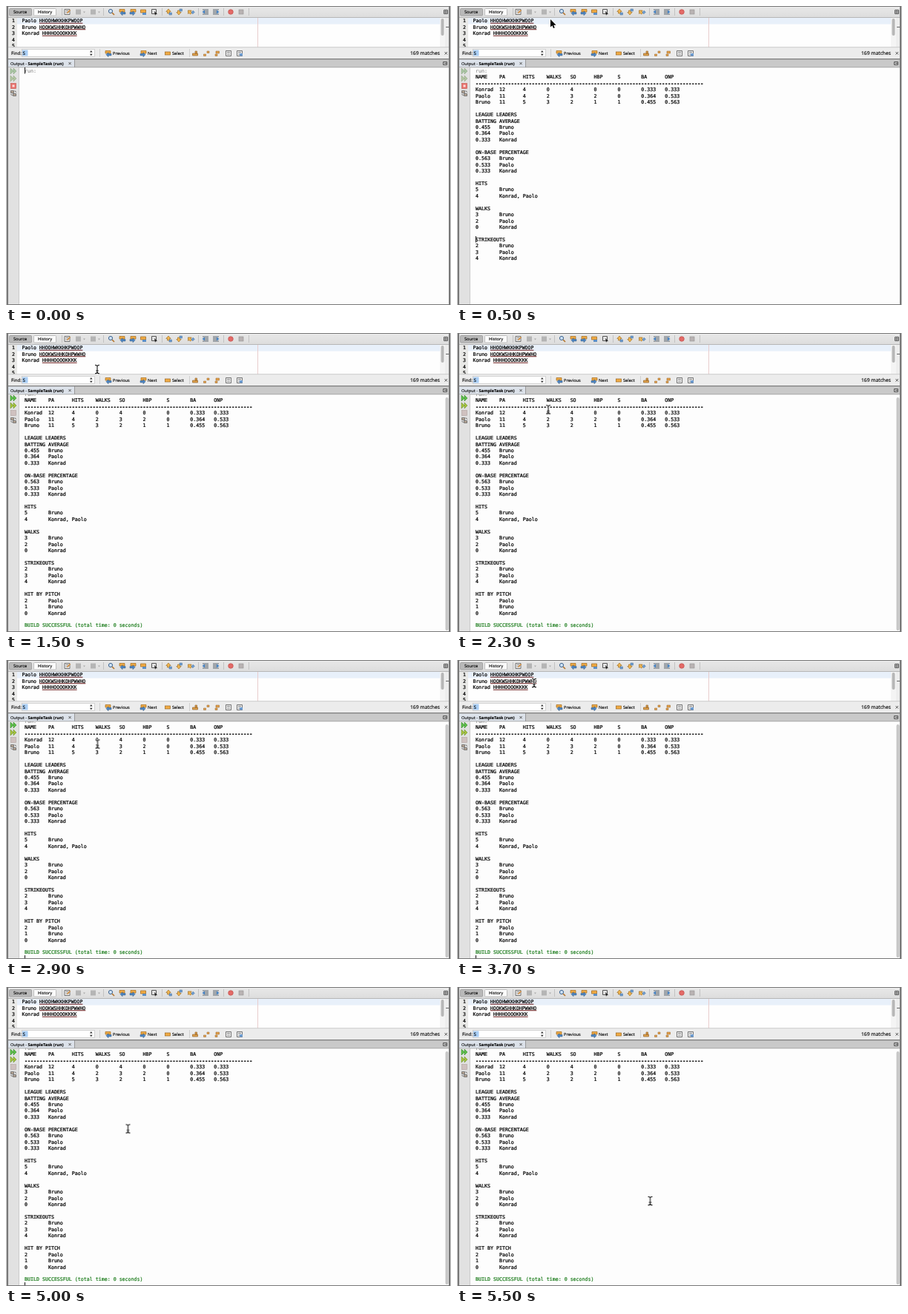
An HTML page that plays this animation: 600x404 px, repeating every 5600 ms.

```html
<!DOCTYPE html>
<html lang="en">
<head>
<meta charset="utf-8">
<title>Program output</title>
<style>
html, body { margin: 0; width: 100%; height: 100%; overflow: hidden; background: #fdfdfd; }
svg { display: block; width: 600px; height: 404px; }
text {
  font: 5.7px "Noto Sans", sans-serif; fill: #000; stroke: #000; stroke-width: .1;
  white-space: pre; text-rendering: geometricPrecision;
}
.mono text { font: 6.644px "DejaVu Sans Mono", monospace; stroke-width: .22; }
.code text { font-size: 6.48px; }
.mono .run { fill: #777; stroke: none; }
.mono .rule { stroke-width: .7; }
.mono .done { fill: #1d7d1d; stroke: #1d7d1d; }
.bold { font-weight: bold; }
.line { fill: none; stroke: #555; stroke-width: 1; }

#output, .running, .first, .second, #caret, #blink, #arrow, #beam {
  animation: 5.6s step-end infinite;
}
#output { animation-name: scroll; }
.running { animation-name: hide-later; }
.second { animation-name: show-second; }
.first { animation-name: show-first; }
#caret { animation-name: caret; }
#blink { animation-name: blink; }
#arrow { animation-name: arrow; }
#beam { animation-name: beam; }

@keyframes scroll { 0% { transform: none; } 10.714%, 100% { transform: translateY(-5px); } }
@keyframes hide-later { 0% { opacity: 1; } 10.714%, 100% { opacity: 0; } }
@keyframes show-second { 0% { opacity: 0; } 10.714%, 100% { opacity: 1; } }
@keyframes show-first { 0% { opacity: 0; } 8.928%, 100% { opacity: 1; } }
@keyframes caret {
  0% { transform: none; }
  8.928% { transform: translateY(228px); }
  10.714%, 100% { transform: translateY(321px); }
}
@keyframes blink {
  0%, 28.571%, 46.428%, 64.285%, 82.142% { opacity: 1; }
  19.642%, 37.5%, 55.357%, 73.214%, 91.071%, 100% { opacity: 0; }
}
@keyframes arrow {
  0% { opacity: 1; transform: translate(148px, -15px); animation-timing-function: steps(5); }
  8.928% { opacity: 1; transform: translate(126px, 18px); }
  10.714%, 100% { opacity: 0; transform: translate(126px, 18px); }
}
@keyframes beam {
  0% { opacity: 0; transform: translate(126px, 24px); }
  10.714% { opacity: 1; transform: translate(126px, 24px); animation-timing-function: steps(9); }
  26.785% { opacity: 1; transform: translate(123px, 49px); animation-timing-function: steps(4); }
  33.928% { opacity: 1; transform: translate(123px, 100px); }
  37.5% { opacity: 1; transform: translate(123px, 100px); animation-timing-function: steps(8); }
  51.785% { opacity: 1; transform: translate(123.5px, 113.5px); animation-timing-function: steps(8); }
  66.071% { opacity: 1; transform: translate(104px, 31px); animation-timing-function: steps(6); }
  76.785% { opacity: 1; transform: translate(30px, 55px); animation-timing-function: steps(12); }
  98.214%, 100% { opacity: 1; transform: translate(260.5px, 289px); }
}
</style>
</head>
<body>
<svg viewBox="0 0 600 404">
  <defs>
    <linearGradient id="bar" x2="0" y2="1">
      <stop stop-color="#e9e9e9"/><stop offset="1" stop-color="#dcdcdc"/>
    </linearGradient>
    <clipPath id="pane"><rect x="18" y="83" width="574" height="321"/></clipPath>
    <clipPath id="editor"><rect x="3" y="16" width="594" height="39.5"/></clipPath>
    <g id="sheet"><path d="M-3.5-3.5h7v7h-7z" fill="#f0f0f0" stroke="#666" stroke-width=".9"/><path d="M-2-1.5h4M-2 1h4" stroke="#777" stroke-width=".9"/></g>
    <g id="find-step"><path d="M-4-3.5h7v3.5h-7z" fill="#efaa45" stroke="#a36a1c" stroke-width=".7"/><path d="M4 .5h-4v-1.8l-3 3 3 3v-1.8h4z" fill="#4d86c4" stroke="#31577f" stroke-width=".5"/></g>
    <g id="mark-step"><path d="M-1-4l3.2 3.5h-1.7v2.500h-3v-2.500h-1.700z" fill="#f0b550" stroke="#96651b" stroke-width=".6"/><path d="M0 1h3.500v3h-3.500z" fill="#6c9bd0" stroke="#48709b" stroke-width=".5"/></g>
    <g id="indent"><path d="M-4-3h8M-1-1h5M-1 1h5M-4 3h8" stroke="#505a66" stroke-width=".9"/><path d="M-4.500 0l3.500-2.500v5z" fill="#427fc0"/></g>
    <g id="dots"><path d="M-3.500 1h3v2.500h-3zM1-3h3v2.500h-3z" fill="#e2a04b" stroke="#956124" stroke-width=".5"/></g>
    <path id="forward" d="M-4-4L0 0l-4 4zM0-4L4 0l-4 4z" stroke-width=".6"/>
    <path id="stem" d="M-3-5.7q3 0 3 2v7.400q0 2-3 2M3-5.700q-3 0-3 2M0 3.700q0 2 3 2M-1.700 2h3.400"/>
  </defs>

  <rect width="600" height="404" fill="#fdfdfd"/>

  <!-- toolbar -->
  <rect width="600" height="16" fill="url(#bar)"/>
  <rect x="4.5" y="3.5" width="30" height="9.5" rx="1" fill="#b9b9b9" stroke="#999" stroke-width=".8"/>
  <rect x="37.5" y="3.5" width="30" height="9.5" rx="1" fill="#fafafa" stroke="#b3b3b3" stroke-width=".8"/>
  <text x="10" y="10.4">Source</text>
  <text x="43" y="10.4">History</text>
  <path d="M75.5 3v10M131.5 3v10M210.5 3v10M259.5 3v10M293.5 3v10M327.5 3v10" stroke="#c2c2c2"/>
  <use href="#sheet" x="82.5" y="8"/>
  <path d="M82 9l4-4 1 1-4 4z" fill="#d98c34"/>
  <path d="M94 4.5h7v7h-7zM114 4.5h7v7h-7z" fill="#888" opacity=".5"/>
  <path d="M104 7.5h3l-1.5 2zM124 7.5h3l-1.5 2z" fill="#aaa"/>
  <circle cx="141" cy="7" r="2.6" fill="#cde0f3" stroke="#3e6590"/>
  <path d="M143 9l3 3" stroke="#b4742c" stroke-width="1.6"/>
  <use href="#find-step" x="157" y="8"/>
  <use href="#find-step" transform="translate(171 8) scale(-1 1)"/>
  <path d="M181.5 5h7v4h-7z" fill="#f0ab45" stroke="#99651f" stroke-width=".7"/>
  <path d="M184 9h5v3h-5z" fill="#5d8fc6"/>
  <path d="M196.5 4.5h6v6h-6z" fill="none" stroke="#555"/>
  <path d="M200 7l4 4-2 .2-1 1.5z" fill="#222"/>
  <use href="#mark-step" x="220" y="8"/>
  <use href="#mark-step" transform="translate(234 8) scale(1 -1)"/>
  <use href="#mark-step" transform="translate(249 8) rotate(-45)"/>
  <use href="#indent" x="269" y="8"/>
  <use href="#indent" transform="translate(283 8) scale(-1 1)"/>
  <circle cx="303" cy="8" r="3.3" fill="#e36a67" stroke="#ba4744" stroke-width=".6"/>
  <rect x="314" y="5" width="6" height="6" fill="#b9b3b3" stroke="#929292" stroke-width=".6"/>
  <path d="M590.5 5.5h5v5h-5zM593 5.5v5M590.5 8h5" class="line"/>

  <!-- editor -->
  <rect x="3" y="15.5" width="594" height="40.5" fill="#fefefe"/>
  <rect x="3" y="16" width="12" height="40" fill="#e9e9e7"/>
  <rect x="15" y="16" width="570" height="8.5" fill="#e8f0fa"/>
  <rect x="585" y="16" width="7" height="40" fill="#f4f4f4"/>
  <rect x="586.5" y="17" width="4" height="23" rx="2" fill="#b7b7b7"/>
  <rect x="592" y="16" width="5" height="40" fill="#ededed"/>
  <path d="M593 28.5h4" stroke="#666"/>
  <path d="M0 15.5H600" stroke="#a9a9a9" stroke-width=".8"/>
  <path d="M339.5 16v40" stroke="#e8cdcd"/>
  <g id="code" class="mono code" clip-path="url(#editor)"></g>

  <!-- find bar -->
  <rect y="55.5" width="600" height="16" fill="#ececec"/>
  <path d="M0 55.7H600" stroke="#bcbcbc" stroke-width=".7"/>
  <text x="7" y="66.2" style="font-size:6.1px">Find:</text>
  <rect x="21.5" y="58.5" width="98" height="10" fill="#fff" stroke="#c4c4c4" stroke-width=".7"/>
  <rect x="22" y="59.5" width="7.5" height="8" fill="#a9cef5"/>
  <text x="22.5" y="66.2" style="font-size:6.1px">S</text>
  <path d="M113 62.5l1.8-2.5 1.8 2.5zM113 64.8l1.8 2.5 1.8-2.5z" fill="#333"/>
  <path d="M126.5 58v11M247.5 58v11" stroke="#d0d0d0"/>
  <use href="#find-step" x="138" y="64"/>
  <text x="144" y="66.2">Previous</text>
  <use href="#find-step" transform="translate(185 64) scale(-1 1)"/>
  <text x="191" y="66.2">Next</text>
  <rect x="214.5" y="62" width="7" height="4" fill="#f0ab45" stroke="#99651f" stroke-width=".7"/>
  <text x="224" y="66.2">Select</text>
  <path d="M251.5 64h7v3h-7zM255 61h2.5v3h-2.5z" fill="#dda04c" stroke="#8c5a20" stroke-width=".6"/>
  <use href="#dots" x="270" y="64"/>
  <path d="M283 61h4.5v3h-4.5zM282 65h3v2.5h-3z" fill="#e2a04b" stroke="#956124" stroke-width=".5"/>
  <use href="#sheet" x="300" y="64"/>
  <use href="#sheet" x="315" y="64"/>
  <path d="M315 64h4v3.5h-4z" fill="#6c9bd0"/>
  <text x="545" y="66.3" style="font-size:6.7px">169 matches</text>
  <path d="M591.5 62l3.5 3.5m0-3.5l-3.5 3.5" class="line"/>

  <!-- output tab -->
  <rect y="71.5" width="600" height="11.5" fill="#c9c9c9"/>
  <path d="M0 71.7H600" stroke="#666"/>
  <rect x="3" y="72.5" width="89" height="10.5" fill="#dce2ea"/>
  <path d="M92.5 72v11" stroke="#999"/>
  <path d="M0 82.8H600" stroke="#9d9d9d" stroke-width=".8"/>
  <text x="6" y="80" style="font-size:5.6px">Output - <tspan class="bold">SampleTask (run)</tspan></text>
  <path d="M84.5 76l3.2 3.2m0-3.2l-3.2 3.2" class="line"/>
  <path d="M589.5 75.5h5v4h-5zM591 77.5h3.5" class="line"/>

  <!-- output side strip -->
  <rect x="3" y="83" width="14.5" height="321" fill="#e1e1e1"/>
  <path d="M17.5 83v321" stroke="#c2c2c2" stroke-width=".8"/>
  <g class="running">
    <use href="#forward" x="10" y="88" fill="#a9c6a2" stroke="#8da889"/>
    <use href="#forward" x="10" y="98" fill="#b2c6a2" stroke="#94a889"/>
    <rect x="6.5" y="104.5" width="7" height="7" fill="#e8716c" stroke="#c9605b" stroke-width=".7"/>
    <rect x="8.5" y="106.5" width="3" height="3" fill="#fbdcda"/>
  </g>
  <g class="second">
    <use href="#forward" x="10" y="88" fill="#5dc04a" stroke="#358c28"/>
    <use href="#forward" x="10" y="98" fill="#a8c43c" stroke="#66902c"/>
    <rect x="6.5" y="104.5" width="7" height="7" fill="#cfc1bf" stroke="#b7a9a7" stroke-width=".7"/>
  </g>
  <path d="M6.5 114.5h4v3h-4zM9.5 118.5h4v3h-4z" fill="#b5a493" stroke="#666" stroke-width=".8"/>
  <path d="M12 114.5l1.5 2M6.5 119l2 2" class="line"/>

  <g clip-path="url(#pane)">
    <g id="output" class="mono">
      <g id="caret"><rect id="blink" x="25" y="83" width="1" height="8.5" fill="#111"/></g>
    </g>
  </g>
  <rect class="second" x="592.5" y="87" width="4" height="315" rx="2" fill="#c6c6c6"/>

  <!-- window frame -->
  <path d="M0 .5H600M0 403.5H600" stroke="#777"/>
  <path d="M.5 0v404M599.5 0v404" stroke="#c8c8c8"/>
  <path d="M2 0v404M598 0v404" stroke="#777" stroke-width="2"/>

  <path id="arrow" d="M0 0v10.5l2.4-2.2L4 12l1.8-.8-1.6-3.5h3.4z" stroke="#fff" stroke-width="1.2" paint-order="stroke"/>
  <g id="beam" fill="none">
    <use href="#stem" stroke="#fff" stroke-width="2.6"/>
    <use href="#stem" stroke="#111" stroke-width="1.1"/>
  </g>
</svg>
<script>
const LINE = 8.445;
const CODE_CHAR = 3.9;
const svgNS = 'http://www.w3.org/2000/svg';

function add(parent, tag, attrs, content = '') {
  const node = document.createElementNS(svgNS, tag);
  for (const key in attrs) node.setAttribute(key, attrs[key]);
  node.textContent = content;
  return parent.appendChild(node);
}

const code = document.getElementById('code');
const players = [['Paolo', 'HHOOHWKKHKPWOOP'], ['Bruno', 'HOOKWSHHKOHPWWHO'], ['Konrad', 'HHHHOOOOKKKK']];
for (let i = 0; i < 5; i++) {
  const y = 22.4 + i * LINE;
  add(code, 'text', { x: 8, y }, i + 1);
  if (!players[i]) continue;
  const [name, plays] = players[i];
  const start = 21.5 + (name.length + 1) * CODE_CHAR;
  add(code, 'text', { x: 21.5, y }, `${name} ${plays}`);
  add(code, 'path', {
    d: `M${start} ${y + 0.9}h${plays.length * CODE_CHAR}`,
    stroke: '#6e1c1c', 'stroke-width': 1.1
  });
}

const listing = `run:
NAME|PA|HITS|WALKS|SO|HBP|S|BA|ONP
${'-'.repeat(77)}
Konrad|12|4|0|4|0|0|0.333|0.333
Paolo|11|4|2|3|2|0|0.364|0.533
Bruno|11|5|3|2|1|1|0.455|0.563

LEAGUE LEADERS
BATTING AVERAGE
0.455|Bruno
0.364|Paolo
0.333|Konrad

ON-BASE PERCENTAGE
0.563|Bruno
0.533|Paolo
0.333|Konrad

HITS
5|Bruno
4|Konrad, Paolo

WALKS
3|Bruno
2|Paolo
0|Konrad

STRIKEOUTS
2|Bruno
3|Paolo
4|Konrad

HIT BY PITCH
2|Paolo
1|Bruno
0|Konrad

BUILD SUCCESSFUL (total time: 0 seconds)`.split('\n');

function lineClass(row, i) {
  if (i === 0) return 'run';
  if (row.startsWith('--')) return 'first rule';
  if (row.startsWith('BUILD')) return 'second done';
  return i < 31 ? 'first' : 'second';
}

const output = document.getElementById('output');
listing.forEach((row, i) => {
  const cells = row.split('|');
  const line = cells.map(cell => cell.padEnd(8)).join('').trimEnd();
  add(output, 'text', { x: 25, y: 89.95 + i * LINE, class: lineClass(row, i) }, line);
});
</script>
</body>
</html>
```
